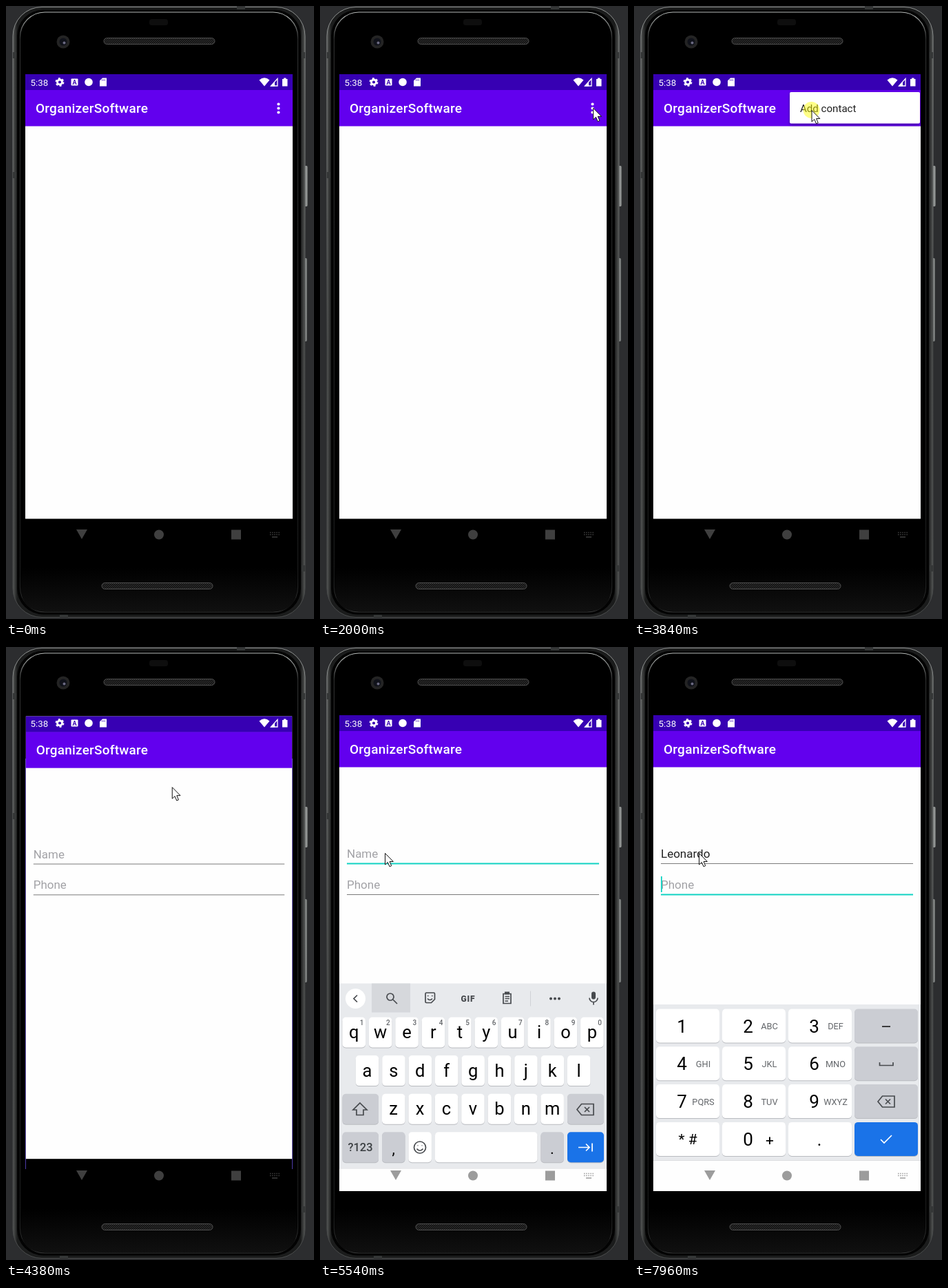
Recreate the animation shown at these times as an HTML page. Size 447x890 px, loop 8 s.

```html
<!DOCTYPE html>
<html lang="en">
<head>
<meta charset="utf-8">
<title>Contact form on a phone</title>
<style>
html, body { margin: 0; width: 100%; height: 100%; overflow: hidden; background: #2c2d2f; }
svg { display: block; width: 447px; height: 890px; font-family: Roboto, "Noto Sans", sans-serif; }
.mid { text-anchor: middle; }
.line { fill: none; stroke: #474a4e; stroke-width: 1.7; }
</style>
</head>
<body>
<svg viewBox="0 0 447 890">
  <defs>
    <linearGradient id="metal">
      <stop offset="0" stop-color="#565857"/><stop offset=".015" stop-color="#1b1c1c"/>
      <stop offset=".985" stop-color="#1b1c1c"/><stop offset="1" stop-color="#565857"/>
    </linearGradient>
    <linearGradient id="rim" x2="0" y2="1">
      <stop offset="0" stop-color="#8f9291"/><stop offset=".25" stop-color="#6c6f6e"/>
      <stop offset=".55" stop-color="#3c3e3e"/><stop offset="1" stop-color="#4a4c4c"/>
    </linearGradient>
    <linearGradient id="glass" x2="0" y2="1">
      <stop offset="0" stop-color="#b4b8b6"/><stop offset=".045" stop-color="#2c2d2d"/>
      <stop offset=".94" stop-color="#191a1a"/><stop offset="1" stop-color="#343535"/>
    </linearGradient>
    <linearGradient id="button">
      <stop offset="0" stop-color="#3c3e3e"/><stop offset=".6" stop-color="#a0a3a2"/><stop offset="1" stop-color="#5c5f5e"/>
    </linearGradient>
    <linearGradient id="chin" x2="0" y2="1">
      <stop offset="0" stop-color="#000"/><stop offset="1" stop-color="#101010"/>
    </linearGradient>
    <pattern id="mesh" width="3" height="3" patternUnits="userSpaceOnUse">
      <rect width="3" height="3" fill="#111"/><path d="M0 3L3 0" stroke="#444" stroke-width=".8"/>
    </pattern>
    <clipPath id="screen"><rect x="28" y="99" width="388" height="691"/></clipPath>
    <clipPath id="reveal"><rect id="revealBox" y="122" width="300" height="70"/></clipPath>
    <filter id="soft" x="-10%" y="-20%" width="120%" height="150%">
      <feDropShadow dx="0" dy="2" stdDeviation="2" flood-opacity=".35"/>
    </filter>
    <g id="app">
      <rect x="28" y="99" width="388" height="645.500" fill="#fefefe"/>
      <rect x="28" y="99" width="388" height="23.500" fill="#3700b3"/>
      <rect x="28" y="122" width="388" height="52.500" fill="#6200ee"/>
      <text x="43" y="155" font-size="19" font-weight="500" letter-spacing=".25" fill="#fff">OrganizerSoftware</text>
    </g>
    <g id="mic">
      <rect x="394" y="489" width="6" height="11" rx="3" fill="#474a4e"/>
      <path class="line" d="M391 498a6 6 0 0 0 12 0M397 504v4"/>
    </g>
    <path id="erase" class="line" d="M-12 0L-5.500-8H12V8H-5.500ZM-1-3.500L6 3.500M6-3.500L-1 3.500"/>
  </defs>

  <!-- phone body -->
  <g fill="url(#button)">
    <rect x="432" y="232" width="6" height="59" rx="2"/>
    <rect x="431" y="366" width="6" height="121" rx="2"/>
  </g>
  <rect x="10" y="1.500" width="424" height="886" rx="42" fill="url(#metal)" stroke="url(#rim)"/>
  <path d="M10 67h5v9h-5zM10 241h5v9h-5zM429 67h5v9h-5zM429 812h5v9h-5zM335 1h12v4h-12zM78 884h12v4h-12z" fill="#353737"/>
  <rect x="16" y="5.500" width="412" height="878" rx="38" fill="#030303"/>
  <rect x="20.500" y="9" width="403" height="871" rx="36" fill="#000" stroke="url(#glass)" stroke-width="1.200"/>
  <path d="M22 815H422V845Q422 879 388 879H56Q22 879 22 845Z" fill="url(#chin)"/>
  <rect x="208" y="19" width="27" height="9" rx="3.500" fill="#0e0e0e"/>
  <circle cx="83" cy="52" r="9.500" fill="#242424"/>
  <circle cx="83" cy="52" r="5.500" fill="#10121a"/>
  <circle cx="84.500" cy="53.500" r="2" fill="#6b6a82"/>
  <g fill="url(#mesh)" stroke="#505050">
    <rect x="142" y="46.500" width="161" height="9" rx="4.500"/>
    <rect x="139" y="837.500" width="161" height="9" rx="4.500"/>
  </g>

  <g clip-path="url(#screen)">
    <rect x="28" y="99" width="388" height="691"/>
    <g id="home">
      <use href="#app"/>
      <path d="M395.500 142.500v.01M395.500 148.500v.01M395.500 154.500v.01" stroke="#fff" stroke-width="4.200" stroke-linecap="round"/>
    </g>
    <path id="edges" d="M28.500 162V758M415.500 162V758" stroke="#4c3aa8"/>
    <g id="popup" clip-path="url(#reveal)">
      <g id="menu">
        <rect x="226" y="125" width="189" height="45.500" rx="2" fill="#fff" filter="url(#soft)"/>
        <rect id="press" x="226" y="125" width="189" height="45.500" fill="#e0e0e0"/>
        <text x="241" y="154" font-size="15.100" fill="#212121">Add contact</text>
      </g>
    </g>
    <g id="form">
      <use href="#app"/>
      <rect id="nameLine" x="39" width="366"/>
      <rect id="phoneLine" x="39" width="366"/>
      <text id="name" x="39" y="306" font-size="17"></text>
      <text x="39" y="351" font-size="17" fill="#a2a2a6">Phone</text>
      <rect id="compose" x="39" y="307.500" height="1" fill="#222"/>
      <rect id="caret" width="1.800" height="23" fill="#10d3c3"/>
    </g>
    <rect id="navBack" x="28" y="744.500" width="388" height="45.500" fill="#fefefe"/>
    <g id="kb">
      <rect x="28" y="477" width="388" height="268" fill="#e8eaed"/>
      <path d="M28 745.500H416" stroke="#dcdde0"/>
      <circle cx="51.500" cy="499" r="14.500" fill="#fff"/>
      <path id="chevron" class="line"/>
      <use href="#mic"/>
      <g id="tools">
        <rect x="75" y="477" width="56" height="42" fill="#d6d8dc"/>
        <circle class="line" cx="102" cy="496.500" r="5"/>
        <path class="line" d="M106 500.500L112 506.500M153 492q0-1.500 1.500-1.500H165q1.500 0 1.500 1.500v8l-5 5h-7q-1.500 0-1.500-1.500zM156 495h1.500M162 495h1.500M156 499q3.500 4 7 0M266 492H277V506H266ZM268.500 496H275M268.500 499H275M268.500 502.500H273"/>
        <path d="M268 489h7v4h-7z" fill="#474a4e"/>
        <text class="mid" x="215" y="503" font-size="12" font-weight="900" letter-spacing=".8" fill="#474a4e">GIF</text>
        <path d="M305.500 488v22" stroke="#d0d2d6"/>
        <path d="M335 499h.01M341 499h.01M347 499h.01" stroke="#474a4e" stroke-width="4" stroke-linecap="round"/>
      </g>
      <g id="hints" class="mid" font-size="16.800" fill="#4a4d51">
        <text x="113" y="505"></text><text x="221" y="505"></text><text x="328" y="505"></text>
        <path d="M164.500 487v23M277.500 487v23" stroke="#cccfd3"/>
      </g>
      <g id="letters"></g>
      <path class="line" d="M58 650.500L68 660.500H63V668H53V660.500H48Z"/>
      <use href="#erase" x="385" y="660"/>
      <circle class="line" cx="145" cy="715" r="8.500"/>
      <path class="line" d="M142 712v.8M148 712v.8M140.500 717q4.500 5.500 9 0"/>
      <path class="line" style="stroke:#fff" d="M375 715H391M386 710l5 5-5 5M395 709v12"/>
    </g>
    <g id="num">
      <rect x="28" y="519" width="388" height="226" fill="#e8eaed"/>
      <path d="M28 745.500H416" stroke="#dcdde0"/>
      <g id="digits"></g>
      <path class="line" style="stroke:#222" d="M360 551H372"/>
      <path class="line" d="M356.500 603v4.500H376V603"/>
      <use href="#erase" x="366" y="660"/>
      <path class="line" style="stroke:#fff" d="M358 715l5 5 11-11"/>
    </g>
    <g id="nav">
      <path d="M102 760H118L110 774ZM327 760.500h14v14h-14z"/>
      <circle cx="222" cy="767.500" r="7"/>
      <path d="M383 764.500H397M383 767.500H397" stroke-width="1.500" stroke-dasharray="1.500 1.600"/>
      <path d="M386 771H394" stroke-width="1.500"/>
    </g>
    <!-- status icons -->
    <g fill="#fff">
      <text x="35.500" y="116" font-size="13.300">5:38</text>
      <g fill="none" stroke="#fff">
        <circle cx="78" cy="110.500" r="3.500" stroke-width="2.800"/>
        <circle cx="78" cy="110.500" r="5.500" stroke-width="1.800" stroke-dasharray="2.880"/>
      </g>
      <rect x="94.500" y="105.500" width="10" height="10" rx="1"/>
      <text class="mid" x="99.500" y="113.800" font-size="9" font-weight="700" fill="#3700b3">A</text>
      <circle cx="120" cy="110.500" r="5.800"/>
      <path d="M140 104.500H146V116.500H136V108.500ZM367.500 107.500Q375 101 382.500 107.500L375 116.500ZM401 106h2v-1.500h3.500V106h2v10.500h-7.500z"/>
      <path d="M384.500 116H394V105.500Z" fill="none" stroke="#fff" stroke-width="1.300"/>
      <path d="M384 116.500H390V110Z"/>
      <path d="M139.500 106.500v2M141.500 106.500v2M143.500 106.500v2" stroke="#3700b3" stroke-width=".8"/>
    </g>
  </g>
  <circle id="click" r="12" fill="#ff0" fill-opacity=".47"/>
  <path id="cursor" d="M0 0V16.500L3.800 13L6.500 19.300L9.200 18.200L6.600 12H11.800Z" fill="#fff" stroke="#111"/>
</svg>
<script>
const $ = id => document.getElementById(id);
const set = (id, attrs) => { for (const k in attrs) $(id).setAttribute(k, attrs[k]); };
const show = (id, on) => { $(id).style.display = on ? '' : 'none'; };
const within = (t, a, b) => t >= a && t < b;
const GREY = '#cbcdd3', BLUE = '#1a73e8', TEAL = '#10d3c3';

const label = (x, y, text, size, more = '') =>
  `<text class="mid" x="${x}" y="${y}" font-size="${size}" ${more}>${text}</text>`;
const key = (x, y, w, h, fill = '#fff') =>
  `<rect x="${x}" y="${y + 1}" width="${w}" height="${h}" rx="5" fill="#b9bbc0"/>
   <rect x="${x}" y="${y}" width="${w}" height="${h}" rx="5" fill="${fill}"/>`;

function letterKeys() {
  let out = '';
  [['qwertyuiop', 32.5], ['asdfghjkl', 51.8], ['zxcvbnm', 90]].forEach(([row, left], r) => {
    const y = 526 + r * 55.6;
    [...row].forEach((c, i) => {
      const x = left + i * 38.4;
      out += key(x, y, 33.5, 44) + label(x + 16.7, y + 30.5, c, 25.5);
      if (!r) out += label(x + 28, y + 11, (i + 1) % 10, 10, 'font-weight="500" fill="#63666a"');
    });
  });
  for (const [x, y, w, fill] of [[32.5, 637.2, 52.5, GREY], [359, 637.2, 53, GREY], [32.5, 692.8, 52.5, GREY],
    [90, 692.8, 33.5, GREY], [128.4, 692.8, 33.5], [167, 692.8, 148.5], [320.4, 692.8, 33.5, GREY], [359, 692.8, 53, BLUE]])
    out += key(x, y, w, 44, fill);
  return out + label(58.5, 720, '?123', 16.5, 'font-weight="500" fill="#3c4043"')
    + label(106.7, 724, ',', 22) + label(337, 724, '.', 22);
}

function digitKeys() {
  const subs = ['', 'ABC', 'DEF', 'GHI', 'JKL', 'MNO', 'PQRS', 'TUV', 'WXYZ'];
  let out = '';
  for (let r = 0; r < 4; r++) for (let c = 0; c < 4; c++) {
    const x = 32 + c * 96, y = 525.5 + r * 54.8;
    out += key(x, y, 92, 49, c < 3 ? '#fff' : r < 3 ? GREY : BLUE);
    if (r < 3 && c < 3) {
      const n = r * 3 + c;
      out += label(x + 37.5, y + 34, n + 1, 26)
        + label(x + 68.5, y + 29.5, subs[n], 12.8, 'fill="#63666a"');
    }
  }
  return out + label(78, 722, '* #', 21) + label(165.5, 724, '0', 26) + label(197, 723, '+', 21) + label(269, 724, '.', 25);
}
$('letters').innerHTML = letterKeys();
$('digits').innerHTML = digitKeys();

// pointer path: time, x, y
const path = [[260, 436, 868], [600, 335, 470], [850, 350, 180], [1040, 382, 241], [1110, 391, 240], [1160, 393, 235],
  [1860, 397, 147], [2200, 395, 149], [2750, 284, 181], [2880, 314, 183], [3080, 314, 183], [3510, 258, 151],
  [4190, 257, 151], [4380, 241, 203], [4950, 92, 298], [5050, 94, 299]];
function pointer(t) {
  const i = path.findIndex(p => p[0] > t);
  if (i < 0) return path[path.length - 1].slice(1);
  const [a, x, y] = path[i - 1], [b, u, v] = path[i], f = (t - a) / (b - a);
  return [x + (u - x) * f, y + (v - y) * f];
}

const word = 'Leonardo';
const typedAt = [6060, 6250, 6400, 6550, 6700, 6860, 7110, 7180];
const hintAt = [6130, 6300, 6450, 6600, 6750, 6980, 7180, 7370];
const upTo = (times, t) => word.slice(0, times.filter(k => k <= t).length);

function drawMenu(t) {
  show('popup', within(t, 2750, 4300));
  const p = Math.min(1, Math.floor(Math.max(0, t - 2750) / 65) / 2);
  const fade = t < 4190 ? 1 : (4300 - t) / 110;
  set('popup', { opacity: Math.max(0, (.075 + .925 * p) * fade) });
  set('revealBox', { x: 344 - 122 * p });
  set('menu', { transform: `translate(${65 * (1 - p)} 0)` });
  show('press', t >= 3900);
}

function drawForm(t) {
  const age = Math.max(0, t - 4190);
  const s = age > 600 ? 1 : 1 - .15 * Math.exp(-age / 54);
  show('home', t < 4330);
  show('edges', within(t, 4330, 4600));
  show('form', t >= 4190);
  set('form', { opacity: Math.min(1, age / 90), transform: `translate(222 444) scale(${s}) translate(-222 -444)` });

  const text = upTo(typedAt, t), hint = upTo(hintAt, t);
  const onName = within(t, 5400, 7830), onPhone = t >= 7830;
  const fieldLine = (id, y, on) => set(id, { y: on ? y - .5 : y, height: on ? 2 : 1, fill: on ? TEAL : '#7b7b7b' });
  fieldLine('nameLine', 314, onName);
  fieldLine('phoneLine', 359, onPhone);

  const name = $('name');
  name.textContent = hint;
  set('compose', { width: hint && t < 7370 ? name.getComputedTextLength() : 0 });
  name.textContent = text || 'Name';
  set('name', { fill: text ? '#222' : '#a2a2a6' });
  show('caret', text);
  set('caret', onPhone ? { x: 39, y: 333 } : { x: 39 + name.getComputedTextLength(), y: 288 });

  show('tools', !text);
  show('hints', text);
  set('chevron', { d: text ? 'M49 494l5 5-5 5' : 'M54 494l-5 5 5 5' });
  const words = $('hints').children;
  [hint || text, word, 'Leonardez'].forEach((w, i) => { words[i].textContent = w; });
}

function drawKeyboards(t) {
  const slide = t < 5470 ? 280 : t < 5540 ? 64 : t < 5600 ? 11.5 : 0;
  show('kb', within(t, 5400, 7960));
  set('kb', { transform: `translate(0 ${slide})` });
  show('num', t >= 7960);
  show('navBack', t >= 5400);
  const tint = t < 5400 ? '#3f3f3f' : '#9c9c9c';
  set('nav', { fill: tint });
  for (const p of $('nav').querySelectorAll('[stroke-width]')) p.setAttribute('stroke', tint);
}

function drawPointer(t) {
  show('cursor', t >= 260);
  show('click', [1930, 3840, 5050].some(c => within(t, c, c + 70)));
  if (t < 260) return;
  const [x, y] = pointer(t);
  set('cursor', { transform: `translate(${x + .5} ${y + .5})` });
  set('click', { cx: x, cy: y });
}

const start = performance.now();
function frame() {
  const t = (performance.now() - start) % 8000;
  drawMenu(t);
  drawForm(t);
  drawKeyboards(t);
  drawPointer(t);
  requestAnimationFrame(frame);
}
frame();
</script>
</body>
</html>
```
